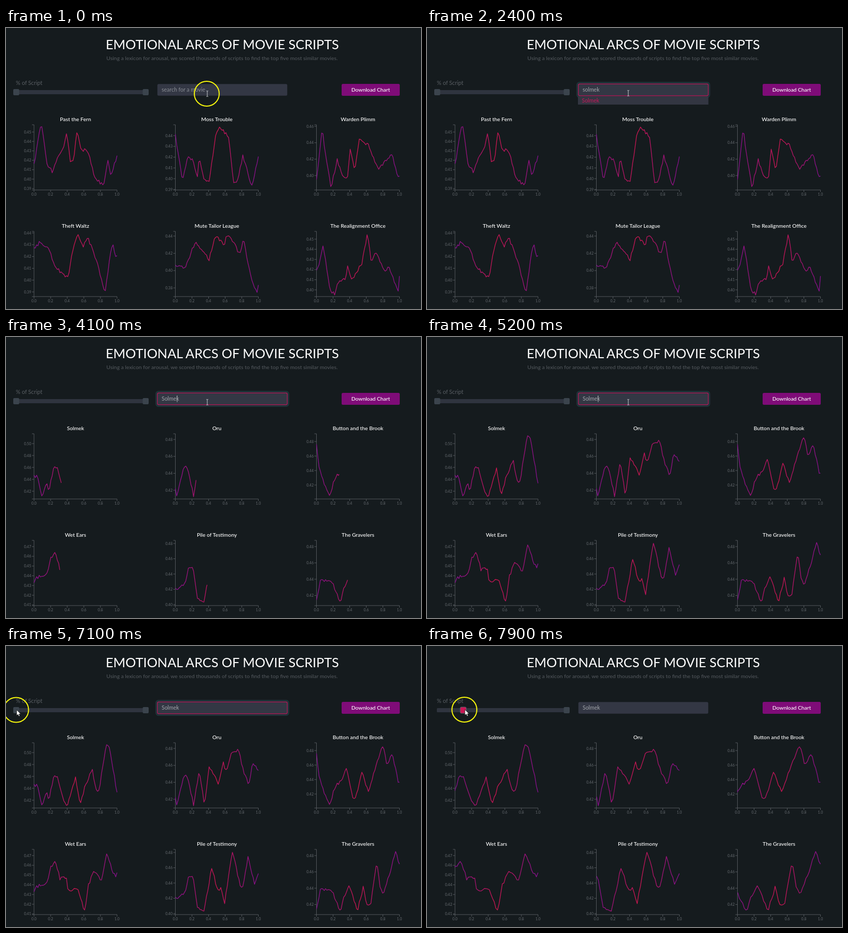
Recreate the animation shown at these times as an HTML page. Size 800 by 543 pixels, loop 8 s.

```html
<!DOCTYPE html>
<html lang="en">
<head>
<meta charset="utf-8">
<title>Emotional arcs</title>
<style>
  html, body { margin: 0; width: 100%; height: 100%; overflow: hidden; background: #151b1e; }
  svg { display: block; width: 800px; height: 543px; font: 10.5px Lato, "Open Sans", sans-serif; }
  .mid { text-anchor: middle; }
  .strong { font-size: 10.3px; font-weight: 500; fill: #fff; text-anchor: middle; }
  .tick { font-size: 7px; fill: #666b70; }
  .end { text-anchor: end; }
  .axis { fill: none; stroke: #5a5f64; stroke-width: .9; }
  .line { fill: none; stroke: url(#arc); stroke-width: 1.3; stroke-linejoin: round; }
</style>
</head>
<body>
<svg id="stage" viewBox="0 0 800 543">
  <defs>
    <linearGradient id="arc" gradientUnits="userSpaceOnUse" x1="0" x2="160" y1="0" y2="0">
      <stop offset="0" stop-color="#85108e"/>
      <stop offset=".5" stop-color="#cc1650"/>
      <stop offset="1" stop-color="#85108e"/>
    </linearGradient>
  </defs>
  <rect width="800" height="543" fill="#151b1e"/>
  <text class="mid" x="417" y="40.5" font-size="25.25" fill="#fff">EMOTIONAL ARCS OF MOVIE SCRIPTS</text>
  <text class="mid" x="416.5" y="62" font-size="10.4" fill="#555a5f">Using a lexicon for arousal, we scored thousands of scripts to find the top five most similar movies.</text>
  <g id="charts"></g>

  <text x="19" y="110" font-size="10.8" fill="#595e63">% of Script</text>
  <rect x="19" y="120" width="251" height="8" rx="1.5" fill="#2f343f"/>
  <rect x="263.5" y="118" width="11.5" height="12" rx="2" fill="#3b444d"/>
  <rect id="handle" y="118" width="11.5" height="12" rx="2"/>

  <rect id="glow" x="290" y="106" width="254" height="27" rx="4" fill="none" stroke="#25424a" stroke-width="4" opacity=".6"/>
  <rect id="field" x="291.8" y="108.2" width="250.4" height="22.6" rx="2.5" fill="#333744" stroke-width="1.2"/>
  <text id="query" x="300" y="123"></text>
  <rect id="caret" x="329.5" y="113" width=".9" height="13" fill="#b5b8bd"/>
  <g id="dropdown">
    <rect x="291" y="132" width="251.5" height="16" fill="#333642"/>
    <text x="298.5" y="143.5" fill="#c8175a">Solmek</text>
  </g>

  <rect x="647" y="108" width="112" height="23" rx="2.5" fill="#7f0c78"/>
  <text class="strong" x="703" y="123">Download Chart</text>

  <g id="pointer">
    <circle id="halo" cx="-1" r="24" fill="none" stroke="#f8f80c" stroke-width="2"/>
    <path id="beam" d="M-1.8-5.5Q0-5.5 0-4.5Q0-5.5 1.8-5.5M0-4.5V4.5M-1.8 5.5Q0 5.5 0 4.5Q0 5.5 1.8 5.5" fill="none" stroke="#c9ccd0" stroke-width="1"/>
    <path id="arrow" d="M0 0V11L2.6 8.6L4.3 12.4L6.2 11.6L4.5 7.9H8Z" fill="#fff" stroke="#111" stroke-width=".7"/>
  </g>
</svg>
<script>
const PLOT_W = 160, PLOT_H = 126, LOOP = 8000;
const COLUMNS = [54, 326.5, 598.5], ROWS = [187, 393];
const SWITCH = 3275, DRAW = 2000;
const STEPS = 64, ROUGHNESS = 3;
const WORD = "solmek";

// ticks: first value, step, first y, spacing, count; turns: main peaks and dips
const before = [
  { title: "Past the Fern", ticks: [.45, .01, 14, 18.2, 7], turns: [[0, 78], [12, 5], [16, 6], [25, 78], [35, 90],
    [46, 60], [57, 46], [63, 13], [70, 70], [76, 70], [83, 9], [91, 48], [104, 50], [117, 102], [134, 118], [143, 66], [148, 99], [160, 61]] },
  { title: "Moss Trouble", ticks: [.44, .01, 21, 20.8, 6], turns: [[0, 21], [14, 108], [23, 63], [35, 70], [42, 103],
    [46, 62], [54, 104], [65, 109], [78, 17], [85, 4], [95, 15], [103, 24], [112, 112], [120, 108], [130, 60], [148, 121], [160, 61]] },
  { title: "Warden Plimm", ticks: [.46, .02, 3, 31.7, 4], turns: [[0, 108], [11, 5], [16, 50], [28, 121], [40, 68],
    [50, 100], [60, 101], [65, 48], [74, 90], [82, 27], [100, 40], [119, 86], [146, 55], [156, 102], [160, 97]] },
  { title: "Theft Waltz", ticks: [.44, .01, 3, 22.8, 6], turns: [[0, 34], [12, 20], [28, 34], [40, 65], [54, 83],
    [66, 90], [72, 46], [84, 6], [94, 30], [104, 12], [123, 65], [137, 121], [145, 57], [152, 21], [156, 50], [160, 49]] },
  { title: "Mute Tailor League", ticks: [.44, .02, 9, 33.4, 4], turns: [[0, 67], [20, 70], [32, 36], [39, 20], [65, 54],
    [78, 7], [94, 27], [99, 7], [111, 19], [124, 46], [131, 15], [140, 62], [150, 104], [158, 121], [160, 104]] },
  { title: "The Realignment Office", ticks: [.45, .01, 15, 19.6, 6], turns: [[0, 77], [6, 60], [13, 25], [26, 114],
    [35, 121], [42, 98], [56, 92], [60, 66], [68, 94], [88, 60], [98, 6], [106, 60], [114, 38], [132, 78], [140, 68], [157, 118], [160, 85]] }
];
const after = [
  { title: "Solmek", ticks: [.5, .02, 19, 23, 5], turns: [[0, 83], [6, 81], [15, 122], [24, 96], [29, 112], [38, 62],
    [45, 64], [57, 113], [64, 121], [80, 67], [89, 117], [98, 86], [112, 50], [119, 89], [125, 94], [139, 5], [145, 6], [160, 97]] },
  { title: "Oru", ticks: [.48, .02, 11, 32.7, 4], turns: [[0, 108], [3, 120], [14, 72], [21, 58], [35, 119], [46, 54],
    [56, 121], [65, 46], [76, 62], [83, 80], [92, 38], [98, 56], [108, 19], [122, 14], [131, 54], [141, 81], [149, 41], [160, 53]] },
  { title: "Button and the Brook", ticks: [.48, .02, 15, 28, 4], turns: [[0, 23], [5, 62], [15, 98], [25, 121], [36, 84],
    [50, 72], [57, 45], [70, 108], [75, 108], [88, 55], [100, 97], [112, 53], [128, 4], [136, 43], [146, 19], [158, 79], [160, 74]] },
  { title: "Wet Ears", ticks: [.47, .01, 12, 18.8, 7], turns: [[0, 84], [3, 73], [26, 64], [32, 36], [41, 20], [50, 57],
    [62, 54], [65, 78], [84, 77], [98, 121], [105, 68], [116, 42], [130, 60], [141, 6], [150, 40], [158, 55], [160, 47]] },
  { title: "Pile of Testimony", ticks: [.48, .02, 6, 29.5, 5], turns: [[0, 94], [6, 95], [21, 79], [26, 49], [35, 57],
    [42, 110], [55, 120], [70, 36], [82, 80], [87, 74], [95, 103], [110, 4], [125, 71], [131, 72], [140, 14], [153, 70], [160, 47]] },
  { title: "The Gravelers", ticks: [.48, .02, 12, 31.5, 4], turns: [[0, 117], [8, 75], [30, 80], [46, 121], [52, 96],
    [63, 68], [79, 118], [90, 74], [98, 111], [104, 109], [116, 23], [123, 74], [129, 86], [143, 40], [152, 5], [160, 27]] }
];

const $ = id => document.getElementById(id);
const clamp = v => Math.max(0, Math.min(1, v));
const easeInOut = u => u < .5 ? 4 * u ** 3 : 1 - 4 * (1 - u) ** 3;
const smooth = u => u * u * (3 - 2 * u);
const show = (el, on) => el.setAttribute("display", on ? "inline" : "none");

function add(parent, tag, attrs, text) {
  const el = document.createElementNS("http://www.w3.org/2000/svg", tag);
  for (const key in attrs) el.setAttribute(key, attrs[key]);
  if (text) el.textContent = text;
  parent.append(el);
  return el;
}

// Values of a [position, ...values] track
function track(keys, at, ease = u => u) {
  let i = 0;
  while (i < keys.length - 2 && at > keys[i + 1][0]) i++;
  const [p0, ...a] = keys[i], [p1, ...b] = keys[i + 1];
  const u = ease(clamp((at - p0) / (p1 - p0)));
  return a.map((v, k) => v + (b[k] - v) * u);
}

function seeded(seed) {
  return () => (seed = seed * 16807 % 2147483647) / 2147483647;
}

// Rough curve through the main turns
function roughen(turns, seed) {
  const random = seeded(seed);
  return Array.from({ length: STEPS + 1 }, (_, i) => {
    const x = i * PLOT_W / STEPS;
    const y = track(turns, x)[0] + (random() * 2 - 1) * ROUGHNESS;
    return [x, Math.max(3, Math.min(PLOT_H - 3, y))];
  });
}

// Outline once the leading share `cut` is zoomed away
function outline(curve, cut) {
  const start = PLOT_W * cut;
  const kept = [[start, ...track(curve, start)], ...curve.filter(([x]) => x > start)];
  return "M" + kept.map(([x, y]) => ((x - start) / (1 - cut)).toFixed(2) + "," + y.toFixed(2)).join("L");
}

function buildCharts(list) {
  const set = add($("charts"), "g", {});
  list.forEach((chart, i) => {
    const g = add(set, "g", { transform: `translate(${COLUMNS[i % 3]} ${ROWS[i / 3 | 0]})` });
    add(g, "text", { class: "strong", x: PLOT_W / 2, y: -7 }, chart.title);
    let axes = `M-4 0H0V${PLOT_H}M-4 ${PLOT_H}H${PLOT_W}`;
    const [value, step, top, gap, count] = chart.ticks;
    for (let k = 0; k < count; k++) {
      const y = top + k * gap;
      axes += `M-4 ${y}H0`;
      add(g, "text", { class: "tick end", x: -5.5, y: y + 2.5 }, (value - k * step).toFixed(2));
    }
    for (let k = 0; k <= 5; k++) {
      axes += `M${k * 32} ${PLOT_H}v4`;
      add(g, "text", { class: "tick mid", x: k * 32, y: PLOT_H + 11 }, (k / 5).toFixed(1));
    }
    add(g, "path", { class: "axis", d: axes });
    chart.curve = roughen(chart.turns, 4021 * (i + 1));
    chart.line = add(g, "path", { class: "line", pathLength: 1, d: outline(chart.curve, 0) });
  });
  return set;
}

const pointerPath = [[0, 388, 127], [1000, 388, 126], [5450, 388, 126], [6100, 92, 148], [6400, 85, 148],
  [6550, 85, 148], [7000, 20, 124], [7200, 21, 123], [7500, 42, 123], [7900, 73, 123], [8000, 80, 123]];
const zoomPath = [[7200, 0], [7500, .078], [7900, .2], [8000, .23]];

const beforeSet = buildCharts(before), afterSet = buildCharts(after);

function render(t) {
  const chosen = t >= SWITCH, pressed = t >= 7150;
  const focused = t >= 1000 && !pressed;
  const [cut] = track(zoomPath, t);

  show(beforeSet, !chosen);
  show(afterSet, chosen);
  if (chosen) {
    const drawn = easeInOut(clamp((t - SWITCH) / DRAW));
    for (const { line, curve } of after) {
      line.setAttribute("stroke-dasharray", drawn < 1 ? `${drawn} 2` : "none");
      line.setAttribute("d", outline(curve, cut));
    }
  }

  const typed = Math.max(0, Math.min(WORD.length, Math.floor((t - 1900) / 85) + 1));
  $("query").textContent = chosen ? after[0].title : typed ? WORD.slice(0, typed) : "search for a movie";
  $("query").setAttribute("fill", typed ? "#a2a5aa" : "#898d94");
  show($("dropdown"), typed > 2 && !chosen);
  show($("caret"), chosen && focused && t < 6300 && (t + 200) % 1000 < 500);
  show($("glow"), focused);
  $("field").setAttribute("stroke", focused ? "#bd1759" : "none");

  $("handle").setAttribute("x", 14 + 250 * cut);
  $("handle").setAttribute("fill", pressed ? "#cb1655" : "#3b444d");
  $("handle").setAttribute("stroke", pressed ? "#5a616a" : "none");

  const [x, y] = track(pointerPath, t, t < 7000 ? smooth : undefined);
  $("pointer").setAttribute("transform", `translate(${x} ${y})`);
  $("halo").setAttribute("opacity", t < 5000 ? 1 - clamp((t - 500) / 400) : clamp((t - 5400) / 100));
  show($("beam"), x > 291);
  show($("arrow"), x <= 291);
}

const began = performance.now();
function frame(now) {
  render(Math.max(0, now - began) % LOOP);
  requestAnimationFrame(frame);
}
render(0);
requestAnimationFrame(frame);
</script>
</body>
</html>
```
